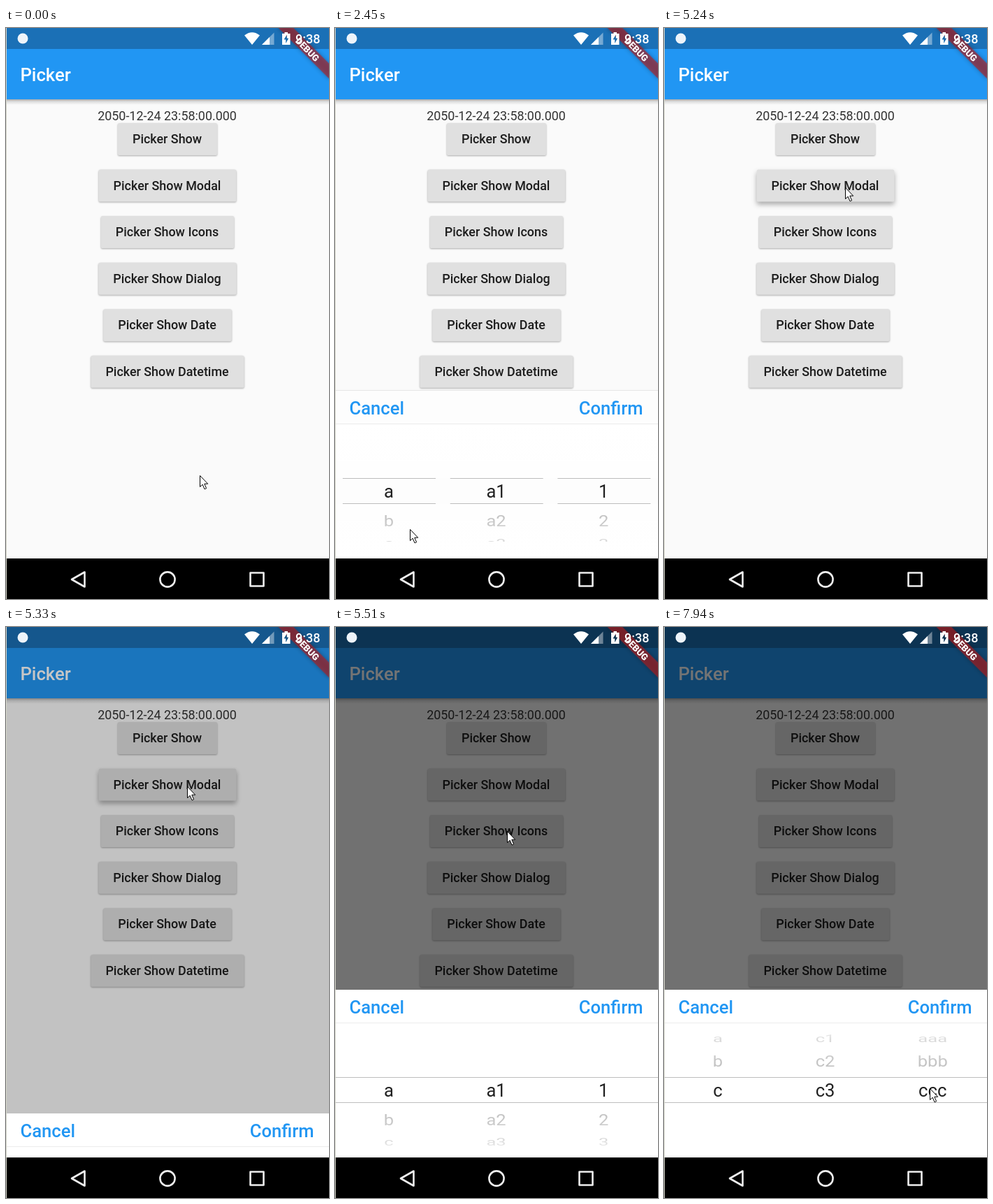
Write an HTML page that moves like this. It is 462x817 px and loops after 8 s.

```html
<!DOCTYPE html>
<html lang="en">
<head>
<meta charset="utf-8">
<title>Picker</title>
<style>
  html, body { margin: 0; width: 100%; height: 100%; overflow: hidden; background: #fafafa; }
  svg { display: block; width: 462px; height: 817px; font-family: Roboto, sans-serif; }
  .title { font-size: 25.6px; font-weight: 500; fill: #fff; }
  .action { font-size: 25.6px; font-weight: 500; fill: #2196f3; }
  .item { font-size: 25.6px; fill: #212121; text-anchor: middle; }
  .label { font-size: 17.9px; font-weight: 500; fill: #1d1d1d; text-anchor: middle; }
  .date { font-size: 17.9px; fill: #333; text-anchor: middle; }
  .clock { font-size: 18px; font-weight: 500; fill: #fff; }
  .banner { font-size: 13px; font-weight: 900; fill: #fff; text-anchor: middle; }
  .nav { fill: none; stroke: #eee; stroke-width: 2.6; stroke-linejoin: round; }
</style>
</head>
<body>
<svg viewBox="0 0 462 817">
  <defs>
    <linearGradient id="barShadow" x2="0" y2="1">
      <stop stop-opacity=".32"/><stop offset=".4" stop-opacity=".12"/><stop offset="1" stop-opacity="0"/>
    </linearGradient>
    <linearGradient id="fade" x2="0" y2="1">
      <stop stop-color="#fff"/>
      <stop offset=".3" stop-color="#fff" stop-opacity=".84"/>
      <stop offset="1" stop-color="#fff" stop-opacity=".68"/>
    </linearGradient>
    <clipPath id="wheelClip"><rect id="wheelBox" width="462"/></clipPath>
  </defs>

  <rect width="462" height="817" fill="#fafafa"/>
  <rect y="102" width="462" height="8" fill="url(#barShadow)"/>
  <rect width="462" height="30.5" fill="#1b70b6"/>
  <rect y="30" width="462" height="72" fill="#2196f3"/>
  <text class="title" x="20.5" y="76">Picker</text>
  <text class="date" x="230.5" y="131.5">2050-12-24 23:58:00.000</text>
  <g id="buttons"></g>

  <rect id="scrim" width="462" height="759"/>

  <g id="sheet">
    <rect id="paper" y="519" width="462" height="245"/>
    <path id="topLine" d="M0 518.5H462" stroke="#e6e6e6"/>
    <path d="M0 566.5H462" stroke="#ececec"/>
    <text class="action" x="20.5" y="553">Cancel</text>
    <text class="action" x="440.5" y="553" text-anchor="end">Confirm</text>
    <g id="wheels" clip-path="url(#wheelClip)"></g>
    <rect y="567" width="462" height="77" fill="url(#fade)"/>
    <rect y="567" width="462" height="77" fill="url(#fade)" transform="matrix(1 0 0 -1 0 1325)"/>
    <path id="rules" stroke="#bdbdbd" fill="none"/>
  </g>

  <g transform="translate(462 0) rotate(45)">
    <rect x="-52" y="35.8" width="104" height="15.4" fill="#b71c1c" fill-opacity=".63"
      style="filter: drop-shadow(0 0 3px rgba(0,0,0,.45))"/>
    <text class="banner" y="48.2">DEBUG</text>
  </g>

  <circle cx="24" cy="15" r="7.5" fill="#eef4fa"/>
  <g fill="#fff">
    <path d="M352 24L341 10.5Q352 2 363 10.5Z"/>
    <path d="M366 24H383.5V6.5Z" opacity=".4"/>
    <path d="M366 24H377V13Z"/>
    <path fill-rule="evenodd" d="M395 8H398.5V6H403V8H406.500V24H395ZM401.800 9.500L397.500 16.500H400.200V22L404.200 14.800H401.800Z"/>
  </g>
  <text class="clock" x="414" y="22">9:38</text>

  <rect y="759" width="462" height="58"/>
  <g class="nav">
    <path d="M112.500 778.500V799.500L94 789Z"/>
    <circle cx="231" cy="789" r="10.600"/>
    <rect x="349.500" y="779.500" width="19" height="19"/>
  </g>
  <rect width="1" height="817" fill="#d3d4c8"/>

  <path id="cursor" d="M.5 .5V16.500L4.200 13.200L7 19.800L9.600 18.700L6.800 12.200H11.700Z" fill="#fff" stroke="#000"/>
</svg>

<script>
const LOOP = 8000, STEP = 90, TRAVEL = 239;
const CENTER = 663, RADIUS = 89, ITEM_ANGLE = 0.492;
const columns = [0, 1, 2];
const $ = id => document.getElementById(id);

function add(parent, tag, attrs, text = '') {
  const el = document.createElementNS('http://www.w3.org/2000/svg', tag);
  for (const name in attrs) el.setAttribute(name, attrs[name]);
  el.textContent = text;
  return parent.appendChild(el);
}

// Eased 0 to 1 between two times.
function ramp(t, start, end) {
  const f = Math.min(1, Math.max(0, (t - start) / (end - start)));
  return f * f * (3 - 2 * f);
}

// Each column is dragged upwards once per sheet, starting at these times.
const dockDrags = [2540, 2950, 3350];
const modalDrags = [6050, 6500, 7220];
const dragStops = starts => starts.flatMap((at, column) => {
  const x = 97 + 144 * column;
  return [[at, x, 710], [at + 270, x, 600]];
});

// Pointer stops: time, x, y.
const stops = [
  [750, 277, 640], [1380, 241, 166], [1650, 239, 161], [1910, 238, 157], [2450, 107, 717],
  ...dragStops(dockDrags),
  [3980, 405, 550], [4300, 405, 550], [4970, 262, 240], [5150, 259, 228],
  [5330, 259, 228], [5510, 246, 292], [5780, 99, 702],
  ...dragStops(modalDrags),
  [6950, 330, 471], [7040, 352, 570], [7670, 385, 554], [7940, 380, 660]
].sort((a, b) => a[0] - b[0]);

function pointerAt(t) {
  let [from, x, y] = stops[0];
  for (const [time, nextX, nextY] of stops.slice(1)) {
    const f = ramp(t, from, time);
    x += (nextX - x) * f;
    y += (nextY - y) * f;
    from = time;
  }
  return [x, y];
}

const names = ['', ' Modal', ' Icons', ' Dialog', ' Date', ' Datetime'];
const buttons = names.map((name, i) => {
  const y = 136 + i * 66.55;
  const box = add($('buttons'), 'rect', { y, height: 46, rx: 2.6, fill: '#e0e0e0' });
  const label = add($('buttons'), 'text', { class: 'label', x: 230.5, y: y + 29 }, 'Picker Show' + name);
  const width = label.getComputedTextLength() + 43;
  box.setAttribute('width', width);
  box.setAttribute('x', 231 - width / 2);
  return box;
});
const pressStarts = [1740, 5000];

const wheels = columns.map(column =>
  [0, 1, 2, 3].map(() => add($('wheels'), 'text', { class: 'item', y: 9 })));

function options(column, first, second) {
  const letters = ['a', 'b', 'c'];
  if (column === 0) return letters;
  if (column === 1) return [1, 2, 3].map(n => letters[first] + n);
  if (first === 2) return letters.map(c => c.repeat(second + 1));
  return [1, 2, 3, 4].map(n => String(second * 4 + n).repeat(first + 1));
}

function drawWheels(drags, t) {
  const turns = drags.map(at => 2 * ramp(t, at, at + 400));
  const [first, second] = turns.map(Math.round);
  for (const column of columns) {
    const values = options(column, first, second);
    wheels[column].forEach((el, i) => {
      const angle = (i - turns[column]) * ITEM_ANGLE;
      const shown = i < values.length && Math.abs(angle) < 1.3;
      el.style.display = shown ? '' : 'none';
      if (!shown) return;
      if (el.textContent !== values[i]) el.textContent = values[i];
      const x = 77 + 153.6 * column, y = CENTER + RADIUS * Math.sin(angle);
      el.setAttribute('transform', `translate(${x} ${y}) scale(1 ${Math.cos(angle)})`);
    });
  }
}

function drawSheet(t) {
  const isModal = t >= 5000;
  const open = isModal ? ramp(t, 5240, 5510) : ramp(t, 1820, 2090) - ramp(t, 4250, 4520);
  const reach = isModal ? 96 : 72;
  $('scrim').setAttribute('opacity', isModal ? 0.545 * open ** (2 / 3) : 0);
  $('sheet').style.display = open > 0 ? '' : 'none';
  $('sheet').setAttribute('transform', `translate(0 ${Math.round((1 - open) * TRAVEL)})`);
  $('paper').setAttribute('fill', isModal ? '#fff' : '#fdfdfd');
  $('topLine').style.display = isModal ? 'none' : '';
  $('rules').setAttribute('d', isModal
    ? 'M0 644.5H462M0 680.5H462'
    : columns.map(c => `M${11 + 153.7 * c} 644.5h133m-133 36h133`).join(''));
  $('wheelBox').setAttribute('y', CENTER - reach);
  $('wheelBox').setAttribute('height', 2 * reach);
  drawWheels(isModal ? modalDrags : dockDrags, t);
}

function draw(now) {
  // The picture is held for one step at a time.
  const time = now % LOOP;
  const anchor = time < 1820 ? 840 : 1820;
  const t = anchor + Math.floor((time - anchor) / STEP) * STEP;

  buttons.forEach((box, i) => {
    const start = pressStarts[i];
    const press = start ? ramp(t, start, start + 150) - ramp(t, start + 330, start + 500) : 0;
    box.style.filter = `drop-shadow(0 ${1.8 + 3 * press}px ${1.2 + 2.5 * press}px rgba(0,0,0,.32))`;
  });
  drawSheet(t);
  $('cursor').setAttribute('transform', `translate(${pointerAt(t).map(Math.round).join(' ')})`);
}

function tick() {
  draw(performance.now());
  requestAnimationFrame(tick);
}
tick();
</script>
</body>
</html>
```
